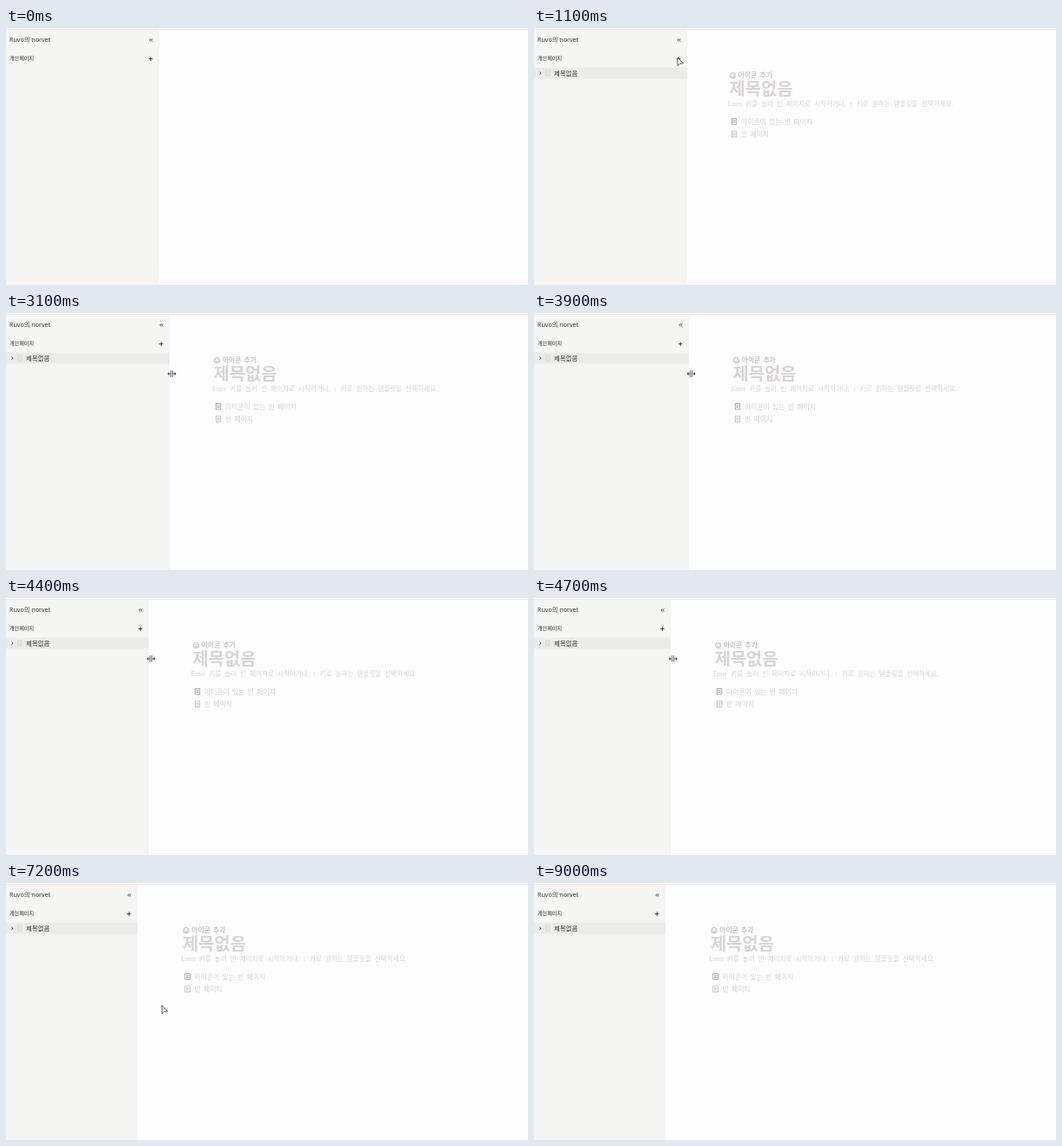
Animation, 600 px wide and 296 px high, one loop 9.1 s. Source, as an HTML page with a canvas:

```html
<!DOCTYPE html>
<html lang="ko">
<head>
<meta charset="utf-8">
<title>Sidebar resize</title>
<style>
  html, body { margin: 0; width: 600px; height: 296px; overflow: hidden; background: #fefdff; }
  canvas { display: block; }
</style>
</head>
<body>
<canvas id="stage" width="600" height="296"></canvas>
<script>
const ctx = document.getElementById('stage').getContext('2d');
const LOOP = 9100, STEP = 100;
const CJK = '"Noto Sans CJK KR", "Noto Sans CJK", sans-serif';
const SANS = '"Open Sans", ' + CJK;
const SERIF = '"Liberation Serif", ' + CJK;
const INK = '#2c2c2a';

const ramp = (t, from, to) => Math.min(1, Math.max(0, (t - from) / (to - from)));
const easeOut = p => 1 - (1 - p) ** 3;

// Sidebar edge: pulled right, then left with a slow start.
function dragEdge(t) {
  return 174 + 14 * easeOut(ramp(t, 2400, 3100))
    - 24 * ramp(t, 3400, 4400) ** 1.26
    - 11.5 * ramp(t, 4400, 4900);
}

function mouseAt(t) {
  if (t < 1200) {
    const p = ramp(t, 200, 800), q = 1 - p;
    const curve = (a, b, c) => a * q * q + 2 * b * p * q + c * p * p;
    return [curve(235, 150, 165), curve(53, 12, 34)];
  }
  const toEdge = 1 - ramp(t, 1200, 1800), grip = ramp(t, 2400, 2600);
  const slip = ramp(t, 5800, 6400), leave = ramp(t, 6700, 7000), last = ramp(t, 7100, 7200);
  return [
    dragEdge(t) + 4 - 13 * toEdge - 1.3 * grip - 2 * slip + 18 * leave + 8 * last,
    68 - 34 * toEdge + 2 * grip + 9 * slip + 62 * leave
  ];
}

function box(x, y, w, h, color) {
  ctx.fillStyle = color;
  ctx.fillRect(x, y, w, h);
}

function text(str, x, y, font, color, gap = 0) {
  ctx.font = font;
  ctx.wordSpacing = gap + 'px';
  ctx.fillStyle = color;
  ctx.fillText(str, x, y);
}

function chevron(x, y, r, color) {
  ctx.beginPath();
  ctx.moveTo(x - r, y - Math.abs(r));
  ctx.lineTo(x, y);
  ctx.lineTo(x - r, y + Math.abs(r));
  ctx.strokeStyle = color;
  ctx.lineWidth = 0.9;
  ctx.stroke();
}

function shape(points, color) {
  ctx.beginPath();
  points.forEach(([x, y]) => ctx.lineTo(x, y));
  ctx.closePath();
  ctx.fillStyle = color;
  ctx.fill();
}

function page(x, y, w, h, color) {
  ctx.strokeStyle = color;
  ctx.lineWidth = 0.7;
  ctx.strokeRect(x + 0.5, y + 0.5, w - 1, h - 1);
  for (let i = 0; i < 2; i++) box(x + 1.7, y + 2.4 + i * 1.9, w - 3.4, 0.8, color);
}

function sidebar(w, hasPage) {
  box(0, 2, w, 294, '#f5f5f3');
  text('Ruvo의 norvet', 4, 15.8, '7.2px ' + SANS, INK);
  for (const x of [w - 11.2, w - 9.2]) chevron(x, 14, -1.7, '#444');
  text('개인페이지', 4, 37.2, '6.1px ' + CJK, INK);
  box(w - 12, 35.2, 4.6, 0.9, '#333');
  box(w - 10.1, 33.4, 0.9, 4.6, '#333');
  if (!hasPage) return;
  box(0, 45.5, w, 13, '#ebebea');
  chevron(8, 52.2, 1.6, '#333');
  page(13, 48.5, 5.5, 7, '#d2d2d2');
  text('제목없음', 23, 54.6, '500 7.4px ' + CJK, INK);
}

function smile(x, y, color) {
  ctx.strokeStyle = color;
  ctx.lineWidth = 0.8;
  for (const [r, from, to] of [[3.2, 0, 2 * Math.PI], [1.7, 0.2, Math.PI - 0.2]]) {
    ctx.beginPath();
    ctx.arc(x, y, r, from, to);
    ctx.stroke();
  }
  for (const dx of [-1.6, 0.7]) box(x + dx, y - 1.4, 0.9, 1, color);
}

function content(x) {
  smile(x + 3.7, 54.6, '#aaa7aa');
  text('아이콘 추가', x + 10, 57.1, '500 7.8px ' + CJK, '#aaa7aa', 1.4);
  text('제목없음', x - 0.2, 77, 'bold 19.8px ' + CJK, '#d7d4d6');
  text('Enter 키를 눌러 빈 페이지로 시작하거나, ↕ 키로 원하는 템플릿을 선택하세요.',
    x - 2, 89.6, '7.55px ' + SERIF, '#d4d2d4', 2.2);
  ['아이콘이 있는 빈 페이지', '빈 페이지'].forEach((label, i) => {
    const y = 104 + i * 14.4;
    page(x + 2, y, 6.5, 7.5, i ? '#b0acaf' : '#8f8a8e');
    text(label, x + 13.2, y + 6.9, '7.8px ' + CJK, '#d2d0d2', 1.6);
  });
}

function arrow(x, y) {
  shape([[x, y], [x, y + 9.5], [x + 2.4, y + 7.2], [x + 6.4, y + 6.6]], '#fff');
  ctx.strokeStyle = '#333';
  ctx.lineWidth = 0.8;
  ctx.stroke();
}

function resizer(x, y) {
  for (const s of [-1, 1]) {
    box(x + s - 0.4, y - 3.8, 0.8, 7.6, '#444');
    box(x + s * 2.4 - 0.9, y - 0.4, 1.8, 0.8, '#444');
    shape([[x + s * 5, y], [x + s * 3, y - 1.9], [x + s * 3, y + 1.9]], '#333');
  }
}

function draw(t) {
  const edge = dragEdge(t);
  const snap = t < 2100 ? 2 : t >= 6000 ? -1.5 : 0;
  box(0, 0, 600, 296, '#fefdff');
  box(0, 1, 600, 1, '#e8e7e8');
  sidebar(edge + snap, t >= 1000);
  if (t >= 1100) content(edge + 50.8);
  if (t < 200 || t >= 7300) return;
  const pointer = t >= 1700 && t < 6800 ? resizer : arrow;
  pointer(...mouseAt(t));
}

const start = performance.now();
function tick() {
  const t = (performance.now() - start) % LOOP;
  draw(Math.floor(t / STEP) * STEP);
  requestAnimationFrame(tick);
}
tick();
</script>
</body>
</html>
```
